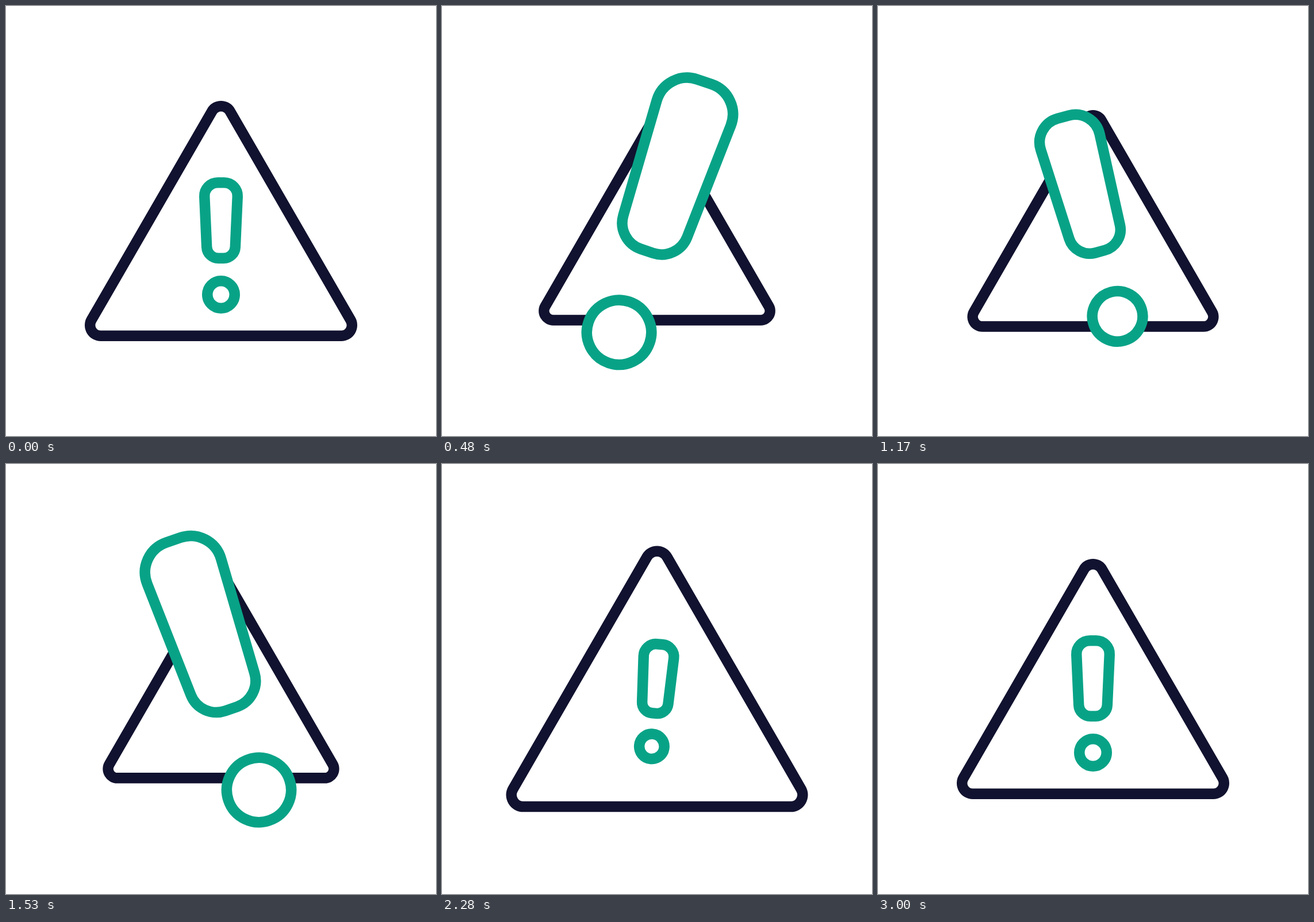
An HTML page for the animation above (3.06 s loop, 748x748 px).

```html
<!DOCTYPE html>
<html lang="en">
<head>
<meta charset="utf-8">
<title>Warning sign</title>
<style>
  html, body { margin: 0; width: 100%; height: 100%; overflow: hidden; background: #fff; }
  svg { display: block; width: 748px; height: 748px; }
  path, circle { fill: #fff; stroke-width: 18.5; vector-effect: non-scaling-stroke; }
  .sign { stroke: #11122f; }
  .mark { stroke: #08a387; }
  .sign, .swing, .mark { transform-origin: 0 0; animation: 3060ms linear infinite; }
  .sign { animation-name: pulse; }
  .swing { animation-name: swing; }
  .mark { animation-name: grow, lift; }

  @keyframes pulse {
    0% { scale: 1; animation-timing-function: cubic-bezier(.4, 0, .75, 1); }
    16.67% { scale: .861; animation-timing-function: cubic-bezier(.33, .5, .67, 1); }
    33.33% { scale: .943; animation-timing-function: cubic-bezier(.3, 0, .3, 1); }
    52.94% { scale: .861; animation-timing-function: cubic-bezier(.75, 0, .6, 1); }
    71.96% { scale: 1.123; animation-timing-function: cubic-bezier(.4, 0, .5, 1); }
    86.27% { scale: .978; animation-timing-function: ease-in-out; }
    98.04%, 100% { scale: 1; }
  }
  @keyframes swing {
    0% { rotate: 0deg; animation-timing-function: cubic-bezier(.4, 0, .75, 1); }
    16.67% { rotate: 19.1deg; animation-timing-function: cubic-bezier(.5, 0, .08, 1); }
    52.94% { rotate: -19deg; animation-timing-function: cubic-bezier(.6, 0, .5, 1); }
    71.96% { rotate: 4.9deg; animation-timing-function: cubic-bezier(.4, 0, .5, 1); }
    86.27% { rotate: -1deg; animation-timing-function: ease-in-out; }
    98.04%, 100% { rotate: 0deg; }
  }
  @keyframes grow {
    0% { scale: 1; animation-timing-function: cubic-bezier(.4, 0, .75, 1); }
    16.67% { scale: 2.386; animation-timing-function: cubic-bezier(.33, .67, .67, 1); }
    32.84% { scale: 1.27; animation-timing-function: cubic-bezier(.3, .7, .6, 1); }
    52.94% { scale: 2.375; animation-timing-function: cubic-bezier(.45, 0, .49, 1); }
    71.96% { scale: .907; animation-timing-function: cubic-bezier(.4, 0, .5, 1); }
    86.27% { scale: 1.015; animation-timing-function: ease-in-out; }
    98.04%, 100% { scale: 1; }
  }
  @keyframes lift {
    0% { translate: 0 0; animation-timing-function: cubic-bezier(.4, 0, .75, 1); }
    16.67% { translate: 0 -99.5px; animation-timing-function: cubic-bezier(.33, .67, .67, 1); }
    32.84% { translate: -4.8px -28px; animation-timing-function: cubic-bezier(.3, .7, .6, 1); }
    52.94% { translate: 0 -99px; animation-timing-function: cubic-bezier(.42, 0, .49, 1); }
    71.96% { translate: 0 .5px; animation-timing-function: ease-in-out; }
    98.04%, 100% { translate: 0 0; }
  }
</style>
</head>
<body>
<svg viewBox="0 0 748 748">
  <g transform="translate(374 374)">
    <g class="sign">
      <path d="M-15.8 -190.7 A18.2 18.2 0 0 1 15.8 -190.7 L225.3 172 A18.5 18.5 0 0 1 209.25 199.75 H-209.25 A18.5 18.5 0 0 1 -225.3 172 Z"/>
    </g>
    <g class="swing">
      <g class="mark">
        <path d="M-5.5 -66.75 H5.5 A23.3 23.3 0 0 1 28.75 -42.4 L24.8 45.5 A20.2 20.2 0 0 1 4.7 64.75 H-4.7 A20.2 20.2 0 0 1 -24.8 45.5 L-28.75 -42.4 A23.3 23.3 0 0 1 -5.5 -66.75 Z"/>
        <circle cy="128" r="23.75"/>
      </g>
    </g>
  </g>
</svg>
</body>
</html>
```
